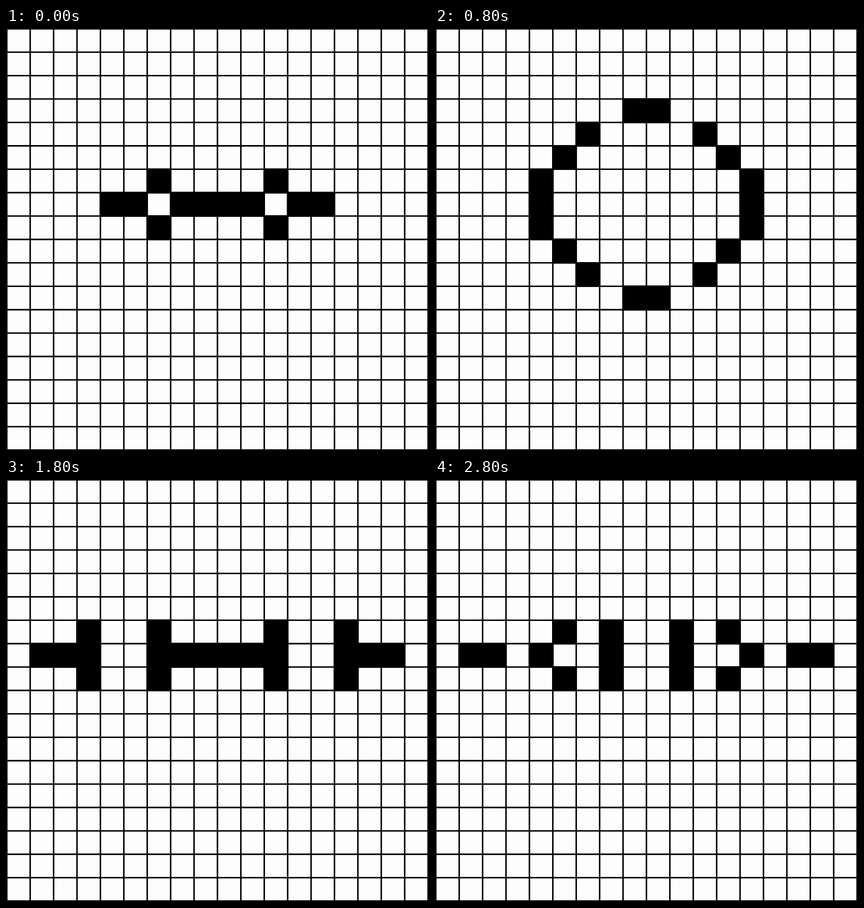
These frames come from a looping animation (748x748 px, 3000 ms). An HTML page:

```html
<!DOCTYPE html>
<html lang="en">
<head>
<meta charset="utf-8">
<title>Game of Life: pentadecathlon</title>
<style>
  html, body { margin: 0; width: 100%; height: 100%; overflow: hidden; background: #fdfdfe; }
  svg { display: block; width: 100vw; height: 100vh; }
</style>
</head>
<body>
<svg viewBox="0 0 748 748">
  <rect width="748" height="748" fill="#fdfdfe"/>
  <path id="grid" fill="none" stroke="#000" stroke-width="2.6"/>
  <path id="cells" stroke="#000" stroke-width="2.6"/>
  <rect x="0.75" y="0.75" width="746.5" height="746.5" fill="none" stroke="#000" stroke-width="2.5"/>
</svg>
<script>
const SIZE = 18, ORIGIN = 1.4, PITCH = 41.39;
const STEP = 200, PERIOD = 15;
const seed = { top: 6, left: 4, rows: ['..#....#..', '##.####.##', '..#....#..'] };

const at = i => +(ORIGIN + i * PITCH).toFixed(2);
const emptyBoard = () => Array.from({ length: SIZE }, () => Array(SIZE).fill(0));

function firstBoard() {
  const board = emptyBoard();
  seed.rows.forEach((row, y) => [...row].forEach((c, x) => {
    board[seed.top + y][seed.left + x] = +(c === '#');
  }));
  return board;
}

function neighbours(board, x, y) {
  let n = -board[y][x];
  for (let dy = -1; dy <= 1; dy++)
    for (let dx = -1; dx <= 1; dx++) n += board[y + dy]?.[x + dx] ?? 0;
  return n;
}

const evolve = board => board.map((row, y) => row.map((alive, x) => {
  const n = neighbours(board, x, y);
  return +(n === 3 || (alive && n === 2));
}));

function outline(board) {
  let d = '';
  board.forEach((row, y) => row.forEach((alive, x) => {
    if (alive) d += `M${at(x)} ${at(y)}H${at(x + 1)}V${at(y + 1)}H${at(x)}Z`;
  }));
  return d;
}

let lines = '';
for (let i = 0; i <= SIZE; i++) lines += `M${at(i)} 0V748M0 ${at(i)}H748`;
document.getElementById('grid').setAttribute('d', lines);

const generations = [];
for (let g = 0, board = firstBoard(); g < PERIOD; g++, board = evolve(board)) {
  generations.push(outline(board));
}

const cells = document.getElementById('cells');
let shown = -1;

function draw(time) {
  const g = Math.floor(time / STEP) % PERIOD;
  if (g !== shown) cells.setAttribute('d', generations[shown = g]);
}

const start = performance.now();
function tick() {
  draw(performance.now() - start);
  requestAnimationFrame(tick);
}
tick();
</script>
</body>
</html>
```
